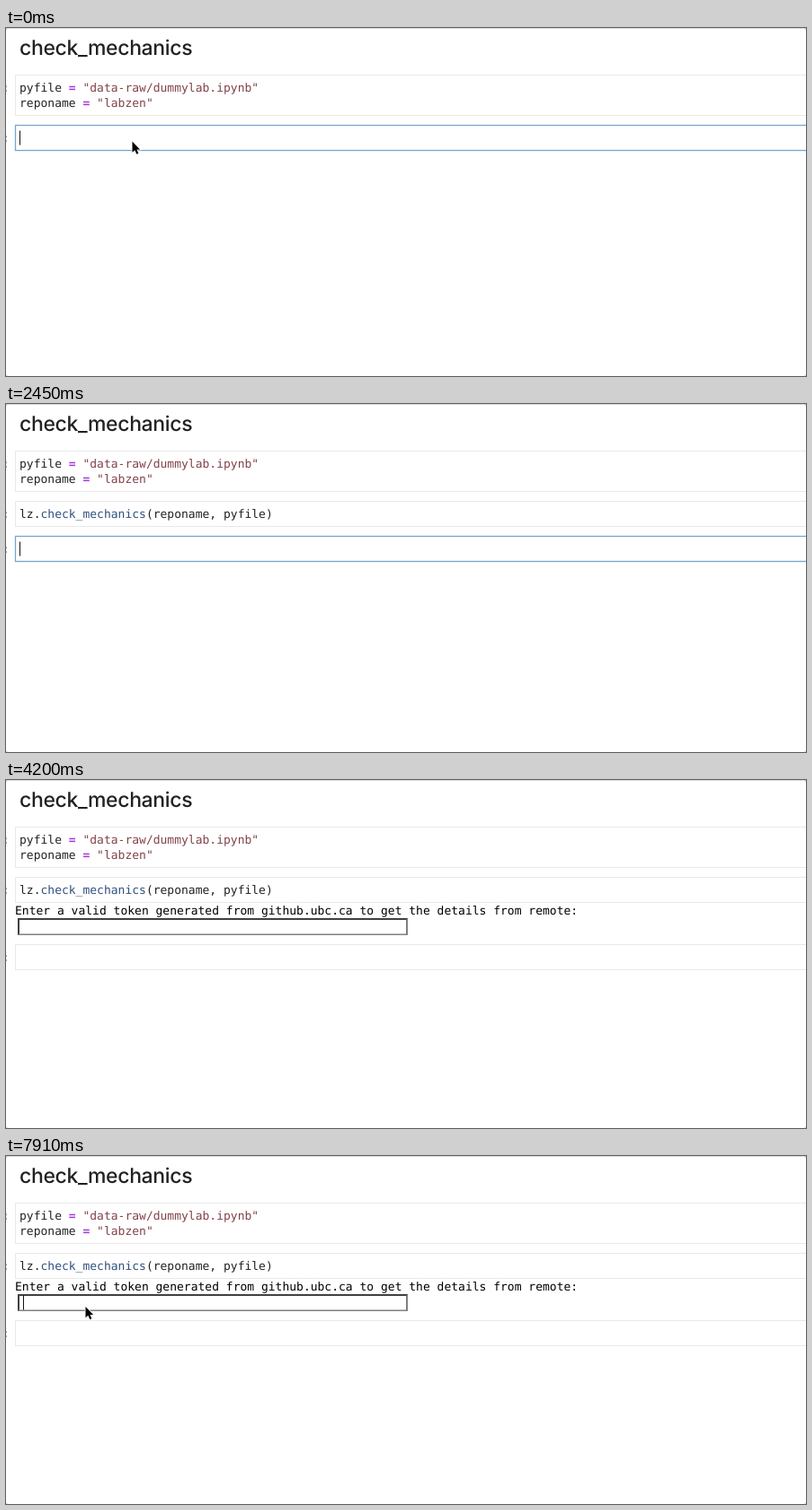
Write an HTML page that moves like this. It is 890 by 388 pixels and loops after 8000 ms.

```html
<!DOCTYPE html>
<html lang="en">
<head>
<meta charset="utf-8">
<title>Notebook</title>
<style>
  html, body { margin: 0; width: 100%; height: 100%; overflow: hidden; background: #c4c4c4; }
  svg { display: block; width: 100%; height: 100%; }
  text { white-space: pre; text-rendering: geometricPrecision; fill: #222; }
  .code text { font: 13px "DejaVu Sans Mono", monospace; }
  .title { font: 500 23px Inter, sans-serif; letter-spacing: -.36px; }
  .code .prompt { fill: #808080; }
  .cell { fill: #fff; stroke: #e9e9e9; }
  .cell.active { stroke: #74a7cf; stroke-width: 1.3; }
  .op { fill: #a237d8; font-weight: bold; }
  .str { fill: #82424a; }
  .fn { fill: #31517e; }
  .match .paren { fill: #4b9a50; }
  .code .out { fill: #000; }
</style>
</head>
<body>
<svg viewBox="0 0 890 388">
  <rect width="890" height="388" rx="3" fill="#dcdcdc"/>
  <rect y="1" width="890" height="387" rx="3" fill="#fff"/>
  <text class="title" x="15" y="30">check_mechanics</text>

  <g class="code">
    <rect class="cell" x="10.5" y="52.5" width="890" height="45"/>
    <text class="prompt" x="-4" y="71">:</text>
    <text x="15" y="71">pyfile <tspan class="op">=</tspan> <tspan class="str">"data-raw/dummylab.ipynb"</tspan></text>
    <text x="15" y="88">reponame <tspan class="op">=</tspan> <tspan class="str">"labzen"</tspan></text>

    <rect class="cell" id="cell" x="10.5" y="108.5" width="890" height="28"/>
    <text class="prompt" x="-4" y="127">:</text>
    <text x="15" y="127" id="call">lz.<tspan class="fn">check_mechanics</tspan><tspan class="paren">(</tspan>reponame, pyfile<tspan class="paren">)</tspan></text>

    <g id="next">
      <rect class="cell" id="nextCell" x="10.5" y="147.5" width="890" height="28"/>
      <text class="prompt" x="-4" y="166">:</text>
    </g>

    <g id="output">
      <text class="out" x="10" y="150">Enter a valid token generated from github.ubc.ca to get the details from remote:</text>
      <rect x="13" y="154" width="434" height="19" fill="#808080"/>
      <path d="M13 173V154H447L445 156H15V171Z" fill="#404040"/>
      <rect x="15" y="156" width="430" height="15.5" fill="#fff"/>
    </g>
  </g>

  <path id="caret" d="M0 0V16" stroke="#111"/>

  <g id="arrow">
    <path d="M0-.5V11.7L2.8 9.2L4.9 13.7L6.9 12.8L5 8.5H8.6Z" stroke="#fff" stroke-width="1.6" paint-order="stroke"/>
  </g>
  <g id="beam">
    <path d="M-3.5-7Q-.5-7 0-5Q.5-7 3.5-7M0-5V5M-3.5 7Q-.5 7 0 5Q.5 7 3.5 7M-2 2.5H2" fill="none" stroke="#222" stroke-width="1.3"/>
  </g>
  <g id="hand" fill="#fff" stroke="#222" stroke-linejoin="round">
    <path d="M-1 .5Q.5-1 1.7 1L3.3 5Q4.6 4 5.8 5.4Q7.2 4.6 8.2 6Q9.8 5.4 10.4 7.4Q11.4 11 9.4 15.5H2.2Q1 13-2.8 9.6Q-3.4 7.2-.6 8.2L1 9.4Z"/>
    <path d="M4.2 9.5V13M6.2 9.5V13M8.2 9.5V13" stroke-width=".8"/>
  </g>
</svg>
<script>
const LOOP = 8000, STEP = 70, BLINK = 525;
// Moments of the story, in ms.
const PASTE = 140, MOVE = 630, REACH = 1120, HIDE = 2380, RUN = 2450,
  ASK = 2520, POINT = 2590, LEAVE = 2660, GONE = 3220, BLUR = 4200,
  ENTER = 6720, FOCUS = 7560;

const el = id => document.getElementById(id);
const show = (id, on) => el(id).setAttribute("visibility", on ? "visible" : "hidden");
const place = (id, x, y) => el(id).setAttribute("transform", `translate(${x} ${y})`);

function glide(t, start, end, from, to) {
  const p = Math.min(1, Math.max(0, (t - start) / (end - start)));
  const eased = p * p * (3 - 2 * p);
  return from.map((v, i) => v + (to[i] - v) * eased);
}

function pointerAt(t) {
  const rest = [140.5, 127], code = [81, 61], title = [215, 35];
  if (t < REACH) return glide(t, MOVE, REACH, rest, code);
  if (t < HIDE) {
    const a = (t - REACH) / 200;
    return [code[0] - 30 * Math.sin(a), code[1] + 10 * (1 - Math.cos(a))];
  }
  if (t >= POINT && t < GONE) return glide(t, LEAVE, GONE, title, [370, 340]);
  if (t >= ENTER) return glide(t, ENTER, 7280, [150, 95], [88.5, 168.5]);
}

// The pointer's shape follows what lies under it.
function shapeAt(t, y) {
  if (t < MOVE || y > 137) return "arrow";
  return y < 44 ? "hand" : "beam";
}

function drawPointer(t) {
  const at = pointerAt(t);
  const shape = at && shapeAt(t, at[1]);
  for (const id of ["arrow", "beam", "hand"]) show(id, id === shape);
  if (at) place(shape, ...at);
}

// Each edit restarts the blink; the caret rests while the page lacks focus.
function drawCaret(t) {
  const since = [0, PASTE, RUN, ASK, FOCUS].filter(s => s <= t).pop();
  const lit = Math.floor((t - since) / BLINK) % 2 === 0;
  show("caret", lit && (t < BLUR || t >= FOCUS));
  if (t >= ASK) place("caret", 19.5, 155.5);
  else if (t >= RUN) place("caret", 15.5, 153.5);
  else place("caret", t >= PASTE ? 297.5 : 15.5, 114.5);
}

function draw(time) {
  const t = Math.floor((time % LOOP) / STEP) * STEP;
  const ran = t >= RUN, asked = t >= ASK;
  show("call", t >= PASTE);
  show("next", ran);
  show("output", asked);
  place("next", 0, asked ? 36 : 0);
  el("call").classList.toggle("match", !ran);
  el("cell").classList.toggle("active", !ran);
  el("nextCell").classList.toggle("active", ran && !asked);
  drawCaret(t);
  drawPointer(t);
}

const start = performance.now();
function tick() {
  draw(performance.now() - start);
  requestAnimationFrame(tick);
}
tick();
</script>
</body>
</html>
```
